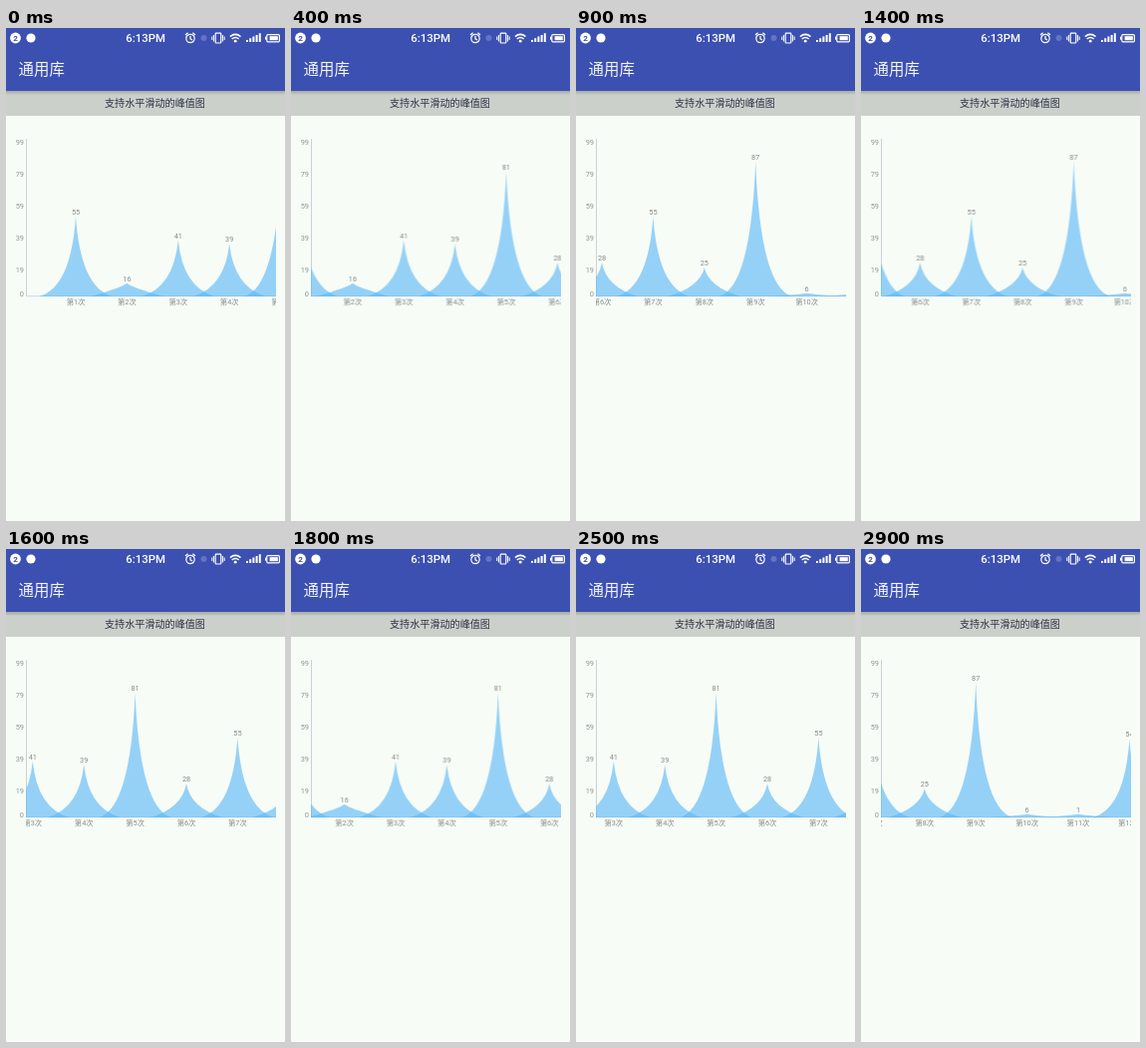
An HTML page that plays this animation: 280x494 px, repeating every 3000 ms.

```html
<!DOCTYPE html>
<html lang="zh">
<head>
<meta charset="utf-8">
<title>峰值图</title>
<style>
  html, body { margin: 0; width: 100%; height: 100%; overflow: hidden; background: #f7fcf6; }
  svg { display: block; width: 280px; height: 494px; }
  text { font-family: Roboto, "Noto Sans CJK SC", "Noto Sans CJK", sans-serif; }
  .mid { text-anchor: middle; }
  .tick { font-size: 7.4px; fill: #8f9694; text-anchor: end; }
  .label { font-size: 7.3px; fill: #858c8b; text-anchor: middle; }
  .peak { fill: rgba(90, 182, 247, .62); }
  .line { fill: none; stroke: #fff; stroke-width: 1.2; }
</style>
</head>
<body>
<svg viewBox="0 0 280 494">
  <defs>
    <clipPath id="view"><rect x="20.5" y="100" width="250.5" height="180"/></clipPath>
    <linearGradient id="shade" x2="0" y2="1">
      <stop offset="0" stop-color="#000" stop-opacity=".2"/>
      <stop offset="1" stop-color="#000" stop-opacity="0"/>
    </linearGradient>
  </defs>
  <rect width="280" height="494" fill="#f7fcf6"/>
  <rect y="63" width="280" height="25" fill="#cbd0ca"/>
  <rect y="63" width="280" height="4" fill="url(#shade)"/>
  <rect width="280" height="63" fill="#3c50b1"/>

  <g fill="#fff">
    <circle cx="9.5" cy="10" r="5.4"/>
    <text class="mid" x="9.5" y="12.9" font-size="8" font-weight="700" fill="#3c50b1">2</text>
    <circle cx="25" cy="10" r="4.6"/>
    <text class="mid" x="140.2" y="14" font-size="11.4" font-weight="500">6:13PM</text>
    <g class="line">
      <circle cx="185" cy="10.5" r="4.2"/>
      <path d="M185 8v2.8l2 1.2M180 7l2.6-2.2M190 7l-2.6-2.2"/>
      <rect x="210.2" y="5.2" width="5.6" height="9.8" rx=".8"/>
      <path d="M208.4 7v6.5M217.6 7v6.5M206.8 8.5v3.5M219.2 8.5v3.5" stroke-width="1"/>
      <path d="M224.9 8.6q5.3-4.4 10.6 0M226.7 11q3.5-2.8 7 0" stroke-width="1.5"/>
      <rect x="261.8" y="6.6" width="12.6" height="7.2" rx="1"/>
    </g>
    <circle cx="198.5" cy="10" r="3" fill="#6474c3"/>
    <circle cx="230.2" cy="13.2" r="1.4"/>
    <path d="M241 12h2v2h-2zM244.2 10.3h2v3.7h-2zM247.4 8.6h2v5.4h-2zM250.6 6.9h2v7.1h-2zM253.8 5.2h2v8.8h-2z"/>
    <rect x="264.6" y="8.2" width="8.2" height="4"/>
    <rect x="260" y="8.7" width="1.4" height="3"/>
  </g>
  <text x="12.6" y="47.4" font-size="15.4" fill="#f4f6ff">通用库</text>
  <text class="mid" x="149.5" y="79" font-size="10.1" fill="#2b3146">支持水平滑动的峰值图</text>

  <g id="ticks"></g>
  <path d="M20.5 111V269" stroke="#c8d3da" fill="none"/>
  <path d="M20 268.7H271" stroke="#bcd3e6" stroke-width=".8" fill="none"/>
  <g clip-path="url(#view)"><g id="chart"></g></g>
</svg>
<script>
const values = [55, 16, 41, 39, 81, 28, 55, 25, 87, 6, 1, 54];
const BASE = 269, FIRST = 70, GAP = 51.4, HALF = 36.7;
const LOOP = 3000, STEP = 100;

// Scroll distance: [time in ms, pixels]
const scroll = [[0, 0], [400, 59.6], [900, 301], [1200, 352], [1600, 146],
                [2100, 0], [2500, 135], [2900, 366], [3000, 366]];

const chart = document.getElementById('chart');
const ticks = document.getElementById('ticks');

function add(parent, tag, attrs, text) {
  const el = document.createElementNS('http://www.w3.org/2000/svg', tag);
  for (const key in attrs) el.setAttribute(key, attrs[key]);
  if (text !== undefined) el.textContent = text;
  parent.appendChild(el);
}

const label = (x, y, text) => add(chart, 'text', { class: 'label', x, y }, text);
const centre = i => FIRST + i * GAP;
const labelY = v => Math.min(261, 278.5 - 1.718 * v);

function peak(x, top) {
  const h = BASE - top;
  const cy = BASE - Math.min(9, h * 0.7);
  const cx = HALF * 0.13;
  add(chart, 'path', {
    class: 'peak',
    d: `M${x - HALF} ${BASE}Q${x - cx} ${cy} ${x} ${top}Q${x + cx} ${cy} ${x + HALF} ${BASE}Z`
  });
}

for (const v of [99, 79, 59, 39, 19, 0]) {
  const y = v ? 114.3 + (99 - v) * 1.6 : 266;
  add(ticks, 'text', { class: 'tick', x: 18, y: y + 2.7 }, v);
}
values.forEach((v, i) => peak(centre(i), labelY(v) + 4.8));
values.forEach((v, i) => {
  label(centre(i), labelY(v) + 2.6, v);
  label(centre(i), 276.6, `第${i + 1}次`);
});

// Monotone cubic through the scroll points
const slope = i => (scroll[i + 1][1] - scroll[i][1]) / (scroll[i + 1][0] - scroll[i][0]);
function tangent(i) {
  if (i === 0 || i === scroll.length - 1) return 0;
  const a = slope(i - 1), b = slope(i);
  return a * b > 0 ? 2 * a * b / (a + b) : 0;
}
function scrollAt(t) {
  let i = 0;
  while (i < scroll.length - 2 && t >= scroll[i + 1][0]) i++;
  const [t0, a] = scroll[i], [t1, b] = scroll[i + 1];
  const d = t1 - t0, u = (t - t0) / d, w = 1 - u;
  return a * (1 + 2 * u) * w * w + b * u * u * (3 - 2 * u)
       + d * u * w * (tangent(i) * w - tangent(i + 1) * u);
}

const frames = [];
for (let t = 0; t <= LOOP; t += STEP) {
  frames.push({
    offset: t / LOOP,
    transform: `translateX(${-scrollAt(t).toFixed(2)}px)`,
    easing: 'steps(1, end)'
  });
}
chart.animate(frames, { duration: LOOP, iterations: Infinity });
</script>
</body>
</html>
```
